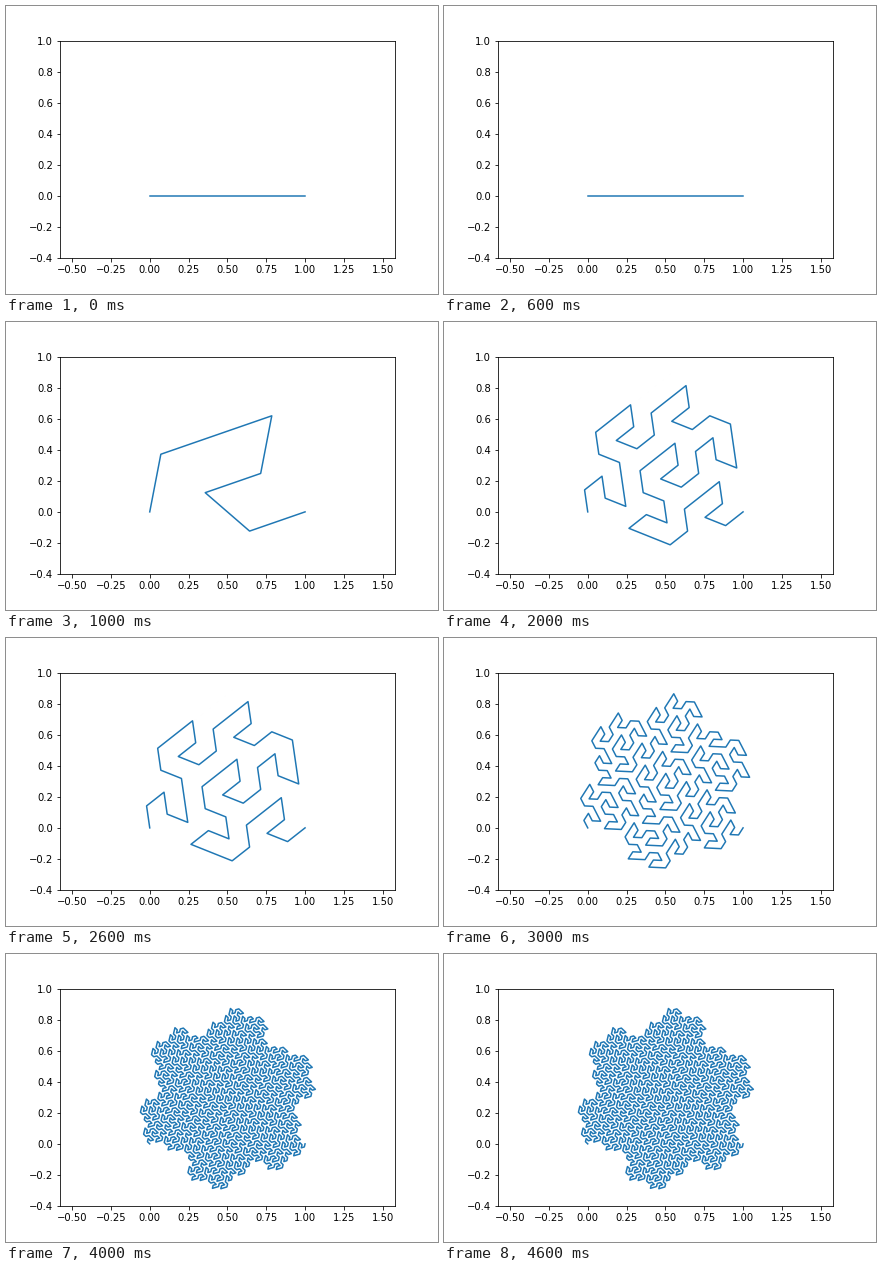
Write a matplotlib script that moves like this. It is 432 px wide and 288 px high and loops after 5000 ms.

```python
import numpy as np
import matplotlib.pyplot as plt
from matplotlib.animation import FuncAnimation

LEVELS = 5
# Each rule lists (kind, turn in units of 60 degrees) for the seven children.
RULES = {
    "A": (("A", 0), ("B", -1), ("B", -3), ("A", -2), ("A", 0), ("A", 0), ("B", 1)),
    "B": (("A", 1), ("B", 0), ("B", 0), ("B", -2), ("A", -3), ("A", -1), ("B", 0)),
}


def gosper(level):
    """Vertices of the Gosper curve running from (0, 0) to (1, 0)."""
    steps = [("B", 0)]
    for _ in range(level):
        steps = [(kind, heading + turn)
                 for parent, heading in steps
                 for kind, turn in RULES[parent]]
    headings = np.array([heading for _, heading in steps])
    z = np.concatenate(([0], np.cumsum(np.exp(1j * np.pi / 3 * headings))))
    z /= z[-1]
    return z.real, z.imag


fig, ax = plt.subplots(figsize=(6, 4), dpi=72)
fig.subplots_adjust(left=0.125, right=0.9, bottom=0.125, top=0.88)

# Equal scale on both axes, centred on x = 0.5.
box = ax.get_position()
half = 0.5 * 1.4 * (box.width * 6) / (box.height * 4)
ax.set_xlim(0.5 - half, 0.5 + half)
ax.set_ylim(-0.4, 1.0)

line, = ax.plot([], [], color="C0", lw=1.5)


def update(level):
    line.set_data(*gosper(level))
    return line,


anim = FuncAnimation(fig, update, frames=LEVELS, interval=1000,
                     repeat=True, repeat_delay=0)
plt.show()
```
